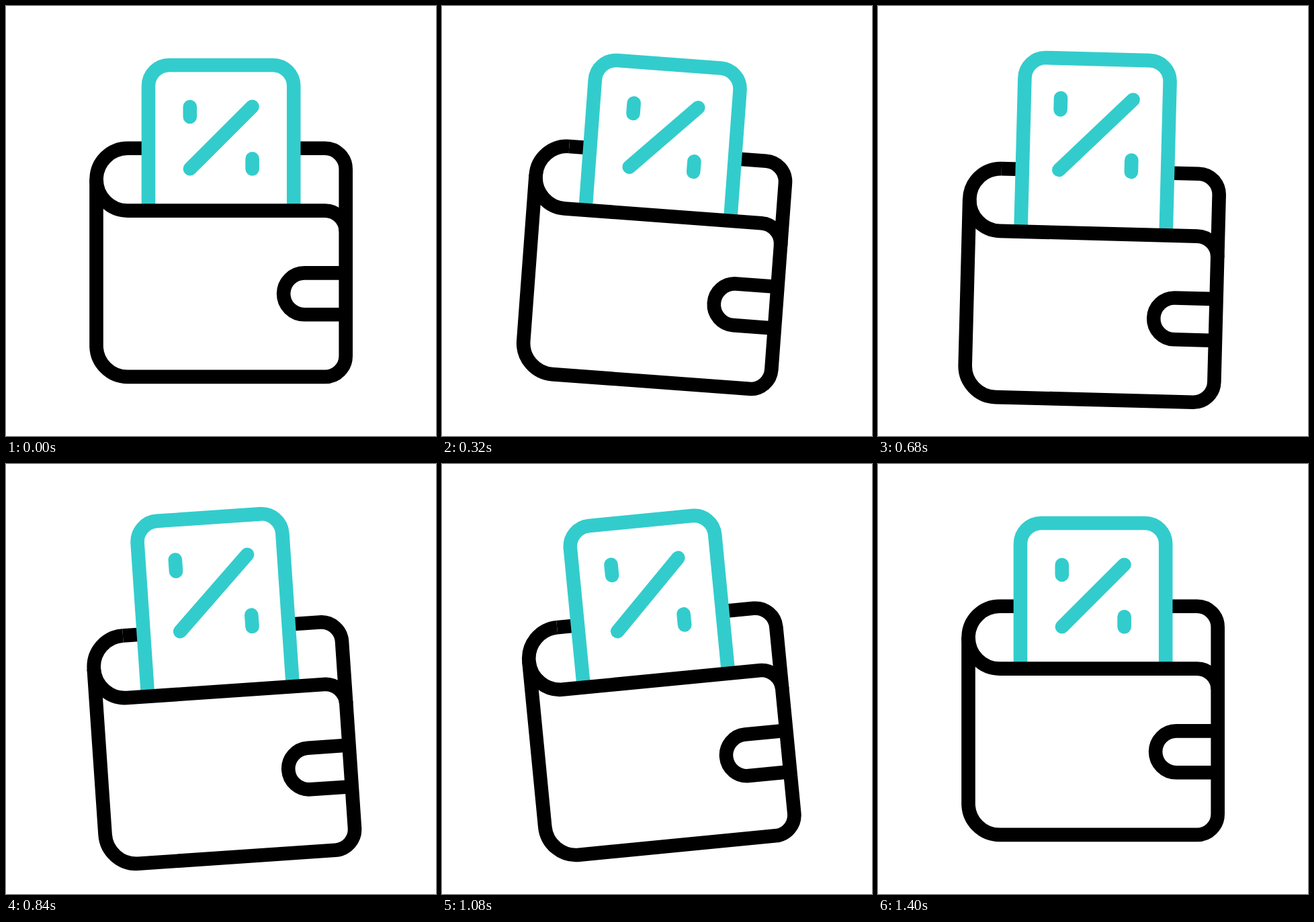
Write an HTML page that moves like this. It is 640 by 640 pixels and loops after 1.52 s.

```html
<!DOCTYPE html>
<html lang="en">
<head>
<meta charset="utf-8">
<title>Wallet with discount card</title>
<style>
  html, body { margin: 0; width: 100%; height: 100%; overflow: hidden; background: #fff; }
  svg { display: block; width: 100%; height: 100%; }
  path { fill: none; stroke-width: 20.6; }
  .ink { stroke: #000; }
  .teal { stroke: #33cccc; }
  .round { stroke-linecap: round; }
  #card { fill: #fff; }
</style>
</head>
<body>
<svg viewBox="0 0 640 640">
  <clipPath id="slot"><rect x="0" y="-100" width="640" height="404"/></clipPath>
  <g id="wallet">
    <path class="ink" d="M181 211.8H474.8A30.9 30.9 0 0 1 505.7 242.7V521A30.9 30.9 0 0 1 474.8 551.9H181A46.5 46.5 0 0 1 134.5 505.4V258"/>
    <g clip-path="url(#slot)">
      <path id="card" class="teal" d="M212 420V119A31 31 0 0 1 243 88H397.2A31 31 0 0 1 428.2 119V420"/>
      <path id="percent" class="teal round"/>
    </g>
    <path class="ink" d="M181 211.8A46.4 46.4 0 0 0 181 304.6H474.8A30.9 30.9 0 0 1 505.7 335.5"/>
    <path class="ink" d="M505.7 397.4H444A30.9 30.9 0 0 0 444 459.2H505.7"/>
  </g>
</svg>
<script>
  const LOOP = 1520, STEP = 40;
  const START = 120, PEAK = 760, END = 1400;
  const BOB = 35, CARD_LIFT = 44.3, SIGN_LIFT = 39.5, SIGN_GROW = 0.165;
  const TILT = [[START, 0], [440, 6], [1003, -6], [END, 0]];
  const RISE = [[START, 0], [PEAK, 1], [END, 0]];

  // Percent sign as line segments around its centre
  const CENTRE = [320.2, 196];
  const SIGN = [
    [46.3, -46.3, -46.3, 46.3],
    [-46.4, -46, -46.4, -31],
    [46.4, 31.4, 46.4, 46.4]
  ];

  const byId = id => document.getElementById(id);
  const wallet = byId('wallet'), card = byId('card'), percent = byId('percent');

  // cubic-bezier(.42, 0, .58, 1)
  function ease(x) {
    let u = x;
    for (let i = 0; i < 6; i++) {
      const err = ((0.52 * u - 0.78) * u + 1.26) * u - x;
      u -= err / ((1.56 * u - 1.56) * u + 1.26);
    }
    return u * u * (3 - 2 * u);
  }

  function track(keys, t) {
    if (t <= keys[0][0]) return keys[0][1];
    for (let i = 1; i < keys.length; i++) {
      const [t0, v0] = keys[i - 1], [t1, v1] = keys[i];
      if (t < t1) return v0 + (v1 - v0) * ease((t - t0) / (t1 - t0));
    }
    return keys[keys.length - 1][1];
  }

  function signPath(rise) {
    const k = 1 + SIGN_GROW * rise;
    const point = (x, y) =>
      (CENTRE[0] + k * x).toFixed(2) + ' ' + (CENTRE[1] - SIGN_LIFT * rise + k * y).toFixed(2);
    return SIGN.map(([a, b, c, d]) => 'M' + point(a, b) + 'L' + point(c, d)).join('');
  }

  function draw(ms) {
    const t = Math.floor((ms % LOOP) / STEP) * STEP;
    const rise = track(RISE, t);
    wallet.setAttribute('transform',
      `translate(0 ${BOB * rise}) rotate(${track(TILT, t)} 320 320)`);
    card.setAttribute('transform', `translate(0 ${-CARD_LIFT * rise})`);
    percent.setAttribute('d', signPath(rise));
  }

  const begin = performance.now();
  function tick() {
    draw(performance.now() - begin);
    requestAnimationFrame(tick);
  }
  tick();
</script>
</body>
</html>
```
